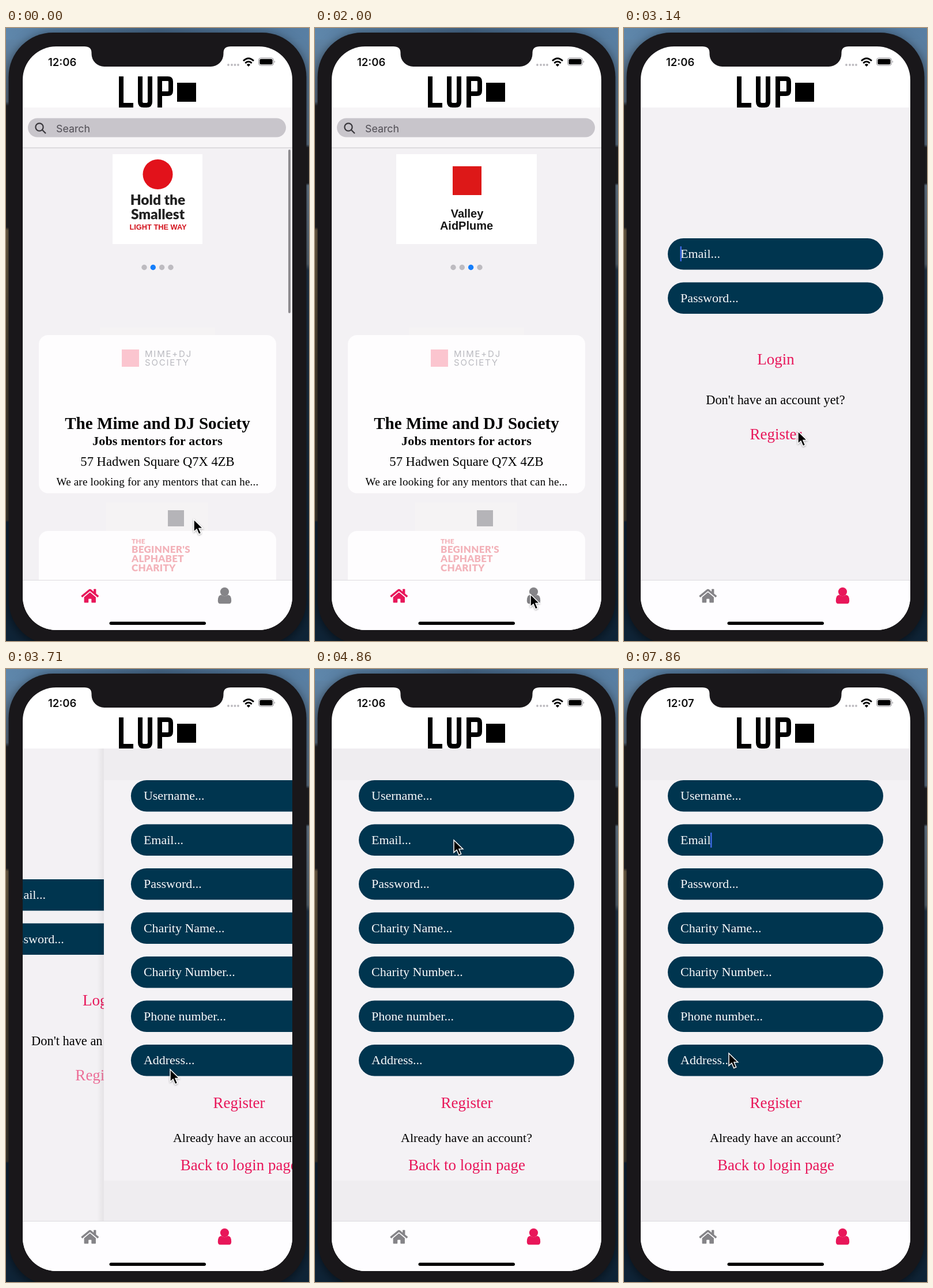
Animation, 526 px wide and 1064 px high, one loop 8000 ms. Source, as an HTML page:

```html
<!DOCTYPE html>
<html lang="en">
<head>
<meta charset="utf-8">
<title>Charity app</title>
<style>
  html, body { margin: 0; width: 100%; height: 100%; overflow: hidden; background: #19171a; }
  svg { display: block; width: 526px; height: 1064px; }
  .serif { font-family: "Liberation Serif", "Noto Serif", serif; }
  .sans { font-family: Inter, "Noto Sans", sans-serif; }
  .arial { font-family: "Liberation Sans", sans-serif; font-weight: 700; }
  .lato { font-family: Lato, "Open Sans", sans-serif; font-weight: 900; }
  .mid { text-anchor: middle; }
  .bold { font-weight: 700; }
  .link { fill: #e8175a; font-size: 27px; }
  #clock { font-weight: 600; }
  #phone { filter: drop-shadow(0 4px 9px rgba(0, 0, 0, .55)); }
</style>
</head>
<body>
<svg id="stage" viewBox="0 0 526 1064"></svg>
<script>
const LOOP = 8000, TICK = 1000 / 7, PAGE = 468;
const RED = '#e8175a', GREY = '#858488', BG = '#f3f1f4', NAVY = '#00354f';

const rect = (x, y, w, h, fill, r = 0) =>
  `<rect x="${x}" y="${y}" width="${w}" height="${h}" rx="${r}" fill="${fill}"/>`;
const dot = (x, y, r, fill) => `<circle cx="${x}" cy="${y}" r="${r}" fill="${fill}"/>`;
const text = (s, x, y, size, cls, fill = '#000', gap = 0, id = '') =>
  `<text id="${id}" class="${cls}" x="${x}" y="${y}" fill="${fill}"
    style="font-size:${size}px;letter-spacing:${gap}px">${s}</text>`;
const centred = (s, y, size, cls = '', gap = 0) => text(s, 263, y, size, 'serif mid ' + cls, '#000', gap);
const link = (s, y, id = '') => `<text id="${id}" class="serif mid link" x="263.5" y="${y}">${s}</text>`;
const field = (label, y, id = '') =>
  rect(76, y, 374, 54.5, NAVY, 27.25) + text(label, 98, y + 34, 22, 'serif', '#f7f8fa', 0, id);
const caret = (id, y) => `<rect id="${id}" x="97.5" y="${y}" width="2.4" height="26" fill="#3f6be8"/>`;
const group = (id, body, attr = '') => `<g id="${id}" ${attr}>${body}</g>`;

const backdrop = `
  <linearGradient id="left" x2="0" y2="1">
    <stop stop-color="#5f87ab"/><stop offset=".12" stop-color="#5b6f84"/>
    <stop offset=".127" stop-color="#242326"/><stop offset=".325" stop-color="#242326"/>
    <stop offset=".33" stop-color="#77664c"/><stop offset=".55" stop-color="#4f4534"/>
    <stop offset=".803" stop-color="#3f3a30"/><stop offset=".806" stop-color="#102438"/>
    <stop offset="1" stop-color="#0f2437"/>
  </linearGradient>
  <linearGradient id="right" x2="0" y2="1">
    <stop stop-color="#587fa4"/><stop offset=".19" stop-color="#60768c"/>
    <stop offset=".195" stop-color="#222226"/><stop offset=".253" stop-color="#222226"/>
    <stop offset=".257" stop-color="#6c8094"/><stop offset=".385" stop-color="#5b6b79"/>
    <stop offset=".395" stop-color="#24394e"/><stop offset="1" stop-color="#0f2437"/>
  </linearGradient>
  <linearGradient id="sky"><stop stop-color="#5f87ab"/><stop offset=".5" stop-color="#456585"/>
    <stop offset="1" stop-color="#587fa4"/></linearGradient>`
  + rect(0, 0, 263, 1064, 'url(#left)') + rect(263, 0, 263, 1064, 'url(#right)')
  + rect(0, 0, 526, 20, 'url(#sky)')
  + group('phone', rect(4.5, 8, 517, 1062, '#19171a', 77));

const wordmark = `<g role="img" aria-label="LUP" fill="none" stroke="#000" stroke-width="8">
    <path d="M200 84V134H221M233 84V128q0 6 6 6h5q6 0 6-6V84M267 138V88h14q5 0 5 5v16q0 5-5 5h-14"/>
  </g>` + rect(297, 95, 33, 33, '#000');

const statusBar = text('12:06', 73, 65.5, 18.5, 'sans', '#111', 0, 'clock')
  + [386, 392, 397.5, 403].map(x => dot(x, 64, 1.9, '#bcbabf')).join('')
  + `<g fill="none" stroke="#000" stroke-width="2.8">
      <path d="M412 57Q421 48.5 430 57M415.3 61Q421 55.5 426.7 61"/></g>
    <path d="M417.8 63.7Q421 61 424.2 63.7L421 67Z"/>
    <rect x="438.5" y="52" width="26" height="13" rx="4" fill="none" stroke="#8d8b90"/>
    <path d="M466 56.5q2 2 0 4z" fill="#8d8b90"/>` + rect(440.3, 53.8, 22.4, 9.4, '#000', 2.5);

const slideA = rect(185, 219, 156, 156, '#fff') + dot(263.5, 254, 26, '#e2121b')
  + text('Hold the', 263.5, 307, 24.5, 'lato mid', '#222')
  + text('Smallest', 263.5, 332, 24.5, 'lato mid', '#222')
  + text('LIGHT THE WAY', 264, 350, 12.8, 'arial mid', '#d3131d');
const slideB = rect(141, 219, 244, 156, '#fff') + rect(239, 240, 50, 50, '#dd1818')
  + text('Valley', 264, 329, 20, 'arial mid', '#161616')
  + text('AidPlume', 263, 350, 20, 'arial mid', '#161616');

const home = rect(29, 138, PAGE, 820, BG)
  + group('slides', slideA + group('', slideB, `transform="translate(${PAGE})"`))
  + [240, 255.3, 270.6, 286].map((x, i) => `<circle id="dot${i}" cx="${x}" cy="415.5" r="4.7"/>`).join('')
  + rect(29, 138, PAGE, 70, '#f7f5f7') + rect(29, 207.5, PAGE, 1, '#c5c3c7')
  + rect(38, 156.5, 448, 33, '#c8c5cb', 16.5)
  + `<g fill="none" stroke="#39373c" stroke-width="2.2"><circle cx="58" cy="172" r="6.6"/>
      <path d="M62.8 176.8L69 183"/></g>`
  + text('Search', 87, 181, 17.8, 'sans', '#504d54')
  + group('scrollbar', rect(490, 211, 4, 284, '#8f8d91', 2))
  + rect(163, 520, 200, 14, '#f5f3f4') + rect(57, 533, 412, 274.5, '#fefdfe', 16)
  + rect(201, 558, 30, 30, '#fbc5cf')
  + text('MIME+DJ', 241, 570.5, 15, 'sans', '#b9b9bf', 1.8)
  + text('SOCIETY', 241, 585.5, 15, 'sans', '#b9b9bf', 1.8)
  + centred('The Mime and DJ Society', 695.5, 29.1, 'bold')
  + centred('Jobs mentors for actors', 723.5, 22, 'bold', .2)
  + centred('57 Hadwen Square Q7X 4ZB', 760, 22.6)
  + centred('We are looking for any mentors that can he...', 794, 19, '', .2)
  + rect(174, 824, 177, 50, '#f5f3f4') + rect(57, 873, 412, 120, '#fefdfe', 16)
  + rect(281, 837, 28, 28, '#b5b4b8')
  + text('THE', 218, 895, 12, 'lato', '#f3b3ba')
  + ["BEGINNER'S", 'ALPHABET', 'CHARITY'].map((s, i) =>
      text(s, 218, 911 + 16 * i, 17, 'lato', '#f3b3ba', .3)).join('');

const login = rect(29, 138, PAGE, 820, BG)
  + field('Email...', 365) + caret('loginCaret', 379) + field('Password...', 441.5)
  + link('Login', 584) + centred("Don't have an account yet?", 653, 22.4) + link('Register', 714, 'goRegister');

const labels = ['Username', 'Email', 'Password', 'Charity Name', 'Charity Number', 'Phone number', 'Address'];
const register = `<linearGradient id="edge"><stop stop-opacity="0"/><stop offset="1" stop-opacity=".06"/></linearGradient>`
  + rect(17, 138, 12, 820, 'url(#edge)') + rect(29, 138, PAGE, 820, '#f4f2f5')
  + rect(29, 138, PAGE, 55, '#efedf0') + rect(29, 888, PAGE, 70, '#efedf0')
  + labels.map((s, i) => field(s + '...', 193 + 76.5 * i, i === 1 ? 'email' : '')).join('')
  + caret('emailCaret', 284)
  + link('Register', 762) + centred('Already have an account?', 820.5, 22) + link('Back to login page', 870);

const houseIcon = `<g id="homeTab" transform="translate(130.500 972) scale(.053)">
    <path d="M4 251L257 43q31-24 62 0L408 117V44q0-12 12-12h56q12 0 12 12V183L572 251q10 8 2 18
      l-26 31q-8 9-17 1L296 107q-8-6-16 0L45 301q-9 8-17-1L3 268q-8-10 1-17Z"/>
    <path d="M280 148L96 300V464q0 16 16 16H224q16 0 16-16V368q0-16 16-16h64q16 0 16 16v96
      q0 16 16 16H464q16 0 16-16V300L296 148q-8-6-16 0Z"/></g>`;
const userIcon = `<g id="userTab"><circle cx="379.5" cy="978.6" r="7.6"/>
    <path d="M373.800 983.900q5.700 4.600 11.400 0q6 0 6 10.300q0 5-4 5H371.800q-4 0-4-5q0-10.300 6-10.300z"/></g>`;
const tabs = rect(29, 958, PAGE, 90, '#fefdff') + rect(29, 958, PAGE, 1, '#dddbdf')
  + houseIcon + userIcon + rect(179.5, 1030.5, 167.5, 5.5, '#000', 2.75);

const notch = `<path fill="#19171a" d="M136 30V32Q148.5 32 148.5 43V45a22 22 0 0 0 22 22H355.5a22 22 0 0 0 22-22V43Q377.5 32 390 32V30Z"/>`;
const arrow = `<path d="M0 0V21.5L5 17L8.7 25.7L12.7 24L9 15.5H15.8Z" fill="#000" stroke="#fff"
  stroke-width="1.5" style="filter:drop-shadow(0 1.5px 1.5px rgba(0,0,0,.35))"/>`;

const stage = document.getElementById('stage');
stage.innerHTML = `<clipPath id="glass"><rect x="29" y="32" width="468" height="1013" rx="58"/></clipPath>
  <clipPath id="body"><rect x="29" y="138" width="468" height="820"/></clipPath>`
  + backdrop
  + group('', rect(29, 32, PAGE, 1013, '#fff')
    + group('', group('home', home) + group('login', login) + group('register', register), 'clip-path="url(#body)"')
    + wordmark + statusBar + tabs, 'clip-path="url(#glass)"')
  + notch + group('pointer', arrow);

const el = id => document.getElementById(id);
const set = (id, name, value) => el(id).setAttribute(name, value);
const show = (id, on) => set(id, 'visibility', on ? 'visible' : 'hidden');
const move = (id, x, y = 0) => set(id, 'transform', `translate(${x} ${y})`);
const part = (t, a, b) => Math.min(1, Math.max(0, (t - a) / (b - a)));
const smooth = u => u * u * (3 - 2 * u);
const blink = (t, from) => t >= from && (t - from) % 1060 < 530;

// time, x, y of the pointer tip
const path = [
  [0, 326, 853], [143, 326, 853], [1143, 368, 955], [1860, 374, 983], [2571, 374, 983],
  [3140, 302, 700], [3430, 302, 700], [3714, 285, 695], [4290, 252, 400], [4430, 252, 400],
  [4857, 241, 297], [5710, 241, 297], [6700, 230, 286], [7000, 230, 286], [7857, 182, 667], [8000, 182, 667]
];

function pointerAt(t) {
  const i = Math.max(1, path.findIndex(p => p[0] > t));
  const [a, b] = [path[i - 1], path[i]];
  const u = smooth(part(t, a[0], b[0]));
  return [a[1] + (b[1] - a[1]) * u, a[2] + (b[2] - a[2]) * u];
}

function draw(ms) {
  const t = Math.floor((ms + 5) / TICK) % 56 * TICK;
  const account = t >= 2570;

  const swipe = smooth(part(t, 570, 1010));
  move('slides', -PAGE * swipe);
  for (let i = 0; i < 4; i++) set('dot' + i, 'fill', i === (swipe < .5 ? 1 : 2) ? '#147efb' : '#bdbbc0');
  set('scrollbar', 'opacity', 1 - part(t, 430, 860));

  const push = 1 - (1 - part(t, 3431, 4290)) ** 3;
  show('home', !account);
  show('login', account && push < 1);
  show('register', push > 0);
  move('login', -.3 * PAGE * push);
  move('register', PAGE * (1 - push));
  show('loginCaret', account && push < 1 && blink(t, 2850));
  set('goRegister', 'opacity', 1 - .8 * part(t, 3300, 3430) + .8 * part(t, 3430, 4000));

  const typed = Math.max(0, Math.floor((t - 6000) / TICK + .01) + 1);
  el('email').textContent = typed ? 'Email'.slice(0, typed) : 'Email...';
  set('emailCaret', 'x', 97.5 + (typed ? el('email').getComputedTextLength() : 0));
  show('emailCaret', typed && typed < 6 || blink(t, typed ? 6570 : 5140));

  const late = t >= 5710;
  el('clock').textContent = late ? '12:07' : '12:06';
  set('clock', 'x', late ? 74 : 73);
  set('homeTab', 'fill', account ? GREY : RED);
  set('userTab', 'fill', account ? RED : GREY);
  move('pointer', ...pointerAt(t));
}

const start = performance.now();
function frame() {
  draw((performance.now() - start) % LOOP);
  requestAnimationFrame(frame);
}
frame();
</script>
</body>
</html>
```
